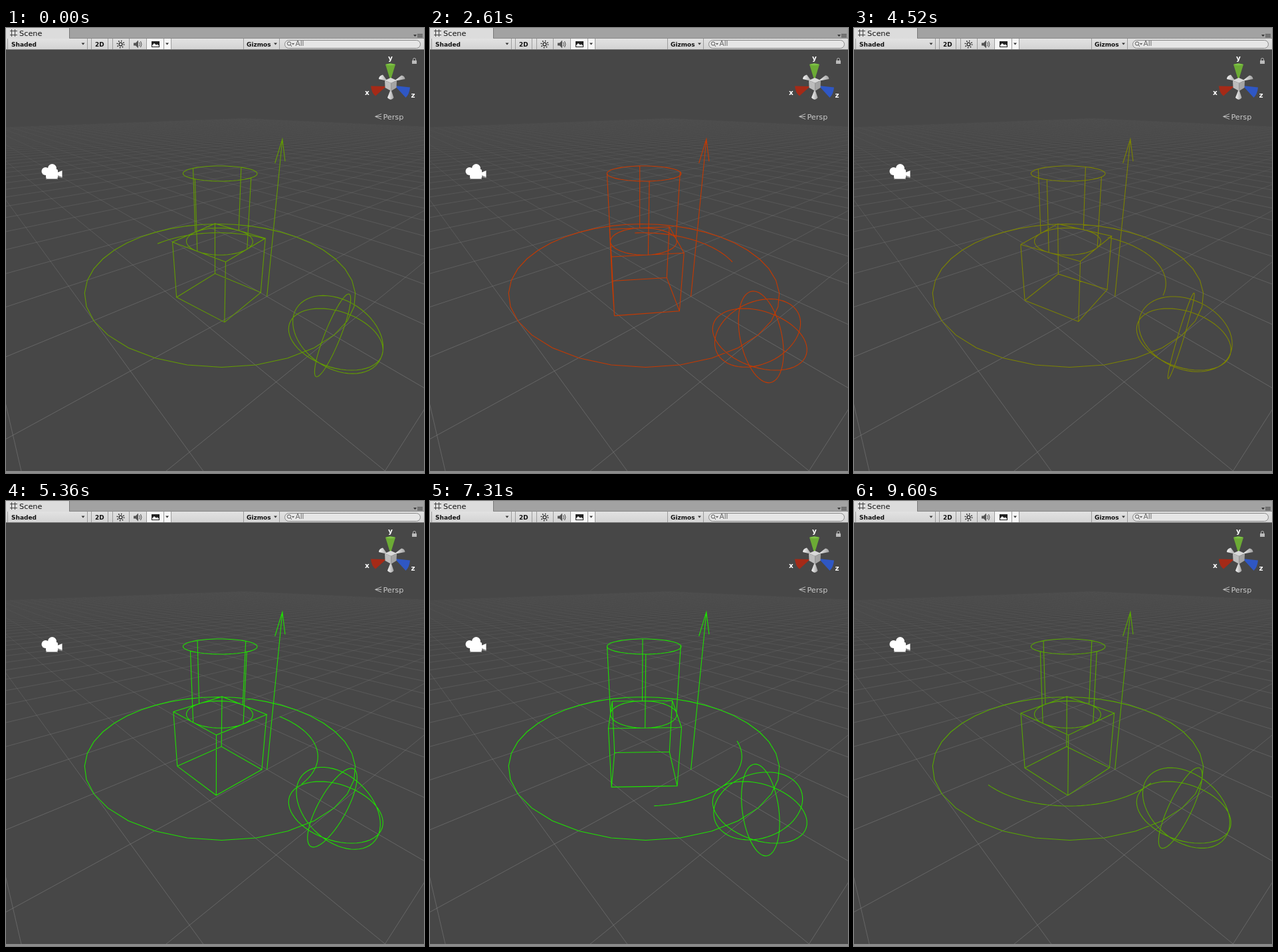
Animation of 629x671 px, one loop 9680 ms. Source, as an HTML page with a canvas:

```html
<!DOCTYPE html>
<html lang="en">
<head>
<meta charset="utf-8">
<title>Scene view</title>
<style>
  html, body { margin: 0; width: 100%; height: 100%; overflow: hidden; background: #474747; }
  canvas, svg { position: absolute; left: 0; top: 0; width: 629px; height: 671px; }
  text { font-family: "DejaVu Sans", sans-serif; fill: #111; }
  .bar { font-size: 9px; font-weight: bold; }
  .axis { font-size: 10.5px; font-weight: bold; fill: #fff; text-anchor: middle; }
</style>
</head>
<body>
<canvas id="view" width="629" height="671"></canvas>
<svg viewBox="0 0 629 671">
  <defs>
    <linearGradient id="tool" x2="0" y2="1"><stop stop-color="#e2e2e2"/><stop offset="1" stop-color="#d2d2d2"/></linearGradient>
    <linearGradient id="cone" x2="1"><stop stop-color="#f6f6f6"/><stop offset="1" stop-color="#a0a0a0"/></linearGradient>
  </defs>

  <!-- tab row -->
  <rect width="629" height="16" fill="#a2a2a2"/>
  <path d="M0 0H95.5V16H0Z" fill="#dcdcdc"/>
  <path d="M95.5 0V16" stroke="#777"/>
  <path d="M95 15.5H629" stroke="#8a8a8a"/>
  <path d="M8.500 2V13M13.500 2V13M6 4.500H17M6 10.500H17" stroke="#444" fill="none"/>
  <text x="20" y="12" font-size="11.3">Scene</text>
  <path d="M613 10h5l-2.500 3Z" fill="#333"/>
  <path d="M619 9.500h8M619 11.500h8M619 13.500h8" stroke="#444"/>

  <!-- toolbar -->
  <rect y="16" width="629" height="17" fill="url(#tool)"/>
  <path d="M0 32.500H629" stroke="#777"/>
  <rect x="211" y="16" width="37" height="16" fill="#f6f6f6"/>
  <path d="M2.500 16V32M122.500 16V32M128.500 16V32M153.500 16V32M160.500 16V32M185.500 16V32M211.500 16V32M237.500 16V32M248.500 16V32M357.500 16V32M411.500 16V32" stroke="#9c9c9c"/>
  <g class="bar">
    <text x="8" y="28">Shaded</text>
    <text x="134" y="28">2D</text>
    <text x="362" y="28">Gizmos</text>
  </g>
  <path d="M113.500 22.500h5l-2.500 3ZM403 22.500h5l-2.500 3ZM240 22.500h5l-2.500 3Z" fill="#333"/>
  <circle cx="172.500" cy="24.500" r="2.400" fill="none" stroke="#222" stroke-width="1.200"/>
  <circle cx="172.500" cy="24.500" r="5" fill="none" stroke="#222" stroke-width="2" stroke-dasharray="1.300 2.627"/>
  <path d="M192 22.500h3l4-4v12l-4-4h-3Z" fill="#555"/>
  <path d="M200.500 21.500q2 3 0 6M202.500 20q3 4.500 0 9" fill="none" stroke="#444"/>
  <rect x="219" y="20" width="12" height="9" fill="#222"/>
  <path d="M220 28v-2l3-3 3 2.500 2-1 2 2v1.500Z" fill="#f4f4f4"/>
  <rect x="419.500" y="18.500" width="204" height="12" rx="6" fill="#e6e6e6" stroke="#888"/>
  <circle cx="426" cy="23.500" r="2.700" fill="none" stroke="#555"/>
  <path d="M428 25.500l2 2.500" stroke="#555"/>
  <path d="M430 23h4l-2 2.500Z" fill="#555"/>
  <text x="435.500" y="27" font-size="10.500" style="fill:#666">All</text>

  <!-- camera icon -->
  <g fill="#fff">
    <circle cx="59.500" cy="216" r="6"/><circle cx="69.500" cy="211.500" r="6.500"/>
    <rect x="60" y="213" width="18" height="14" rx="2"/>
    <path d="M77 218l7.500-3v10l-7.500-3Z"/>
  </g>
  <path d="M60 227.500H78M78 224l6.500 2" stroke="#aaa" fill="none"/>

  <!-- orientation widget -->
  <path d="M574 80L561 77Q561 72 567 70.500Z" fill="url(#cone)"/>
  <path d="M584 80L595 71.500Q600 72 600.500 77Z" fill="url(#cone)"/>
  <path d="M579 92L574 105Q579 111 583.500 105Z" fill="url(#cone)"/>
  <path d="M571 55Q578.500 52 586 55L579.500 76h-2Z" fill="#6cab35"/>
  <path d="M571 55Q578.500 52 586 55Q578.500 58 571 55Z" fill="#7ec246"/>
  <path d="M572 88L549 87.500Q550 98 556 102.500Z" fill="#a52a17"/>
  <path d="M585 87L608 89.500Q607 100 601.500 105Z" fill="#2f57c4"/>
  <path d="M570 79l9-4 9 4-8.500 4Z" fill="#d8d8d8"/>
  <path d="M570 79l9.500 4v12l-9-5Z" fill="#bcbcbc"/>
  <path d="M588 79l-8.500 4v12l8-5Z" fill="#a4a4a4"/>
  <text class="axis" x="578.500" y="49">y</text>
  <text class="axis" x="543.500" y="101">x</text>
  <text class="axis" x="612.500" y="105">z</text>
  <rect x="611" y="49" width="7" height="5" fill="#bbb"/>
  <path d="M612.500 49v-1.500a2 2 0 0 1 4 0V49" fill="none" stroke="#bbb"/>
  <path d="M565 129.500L555.500 133.500L565 137.500M555.500 133.500H565" fill="none" stroke="#bbb"/>
  <text x="567.500" y="138" font-size="11.200" style="fill:#ccc">Persp</text>

  <path d="M0 668H629V671H0Z" fill="#8c8c8c"/>
</svg>

<script>
const LOOP = 9680, RAD = Math.PI / 180;
const ctx = document.getElementById('view').getContext('2d');

// Camera: ground axes are u (screen right) and w (towards the viewer), y is up.
const FOCAL = 447, CX = 315, CY = 350.5, YAW = 39.75 * RAD;
const sinP = Math.sin(27.8 * RAD), cosP = Math.cos(27.8 * RAD);

const toCam = ([u, y, w]) => [
  0.064 + u,
  0.134 - y * cosP + w * sinP,
  4.73 - w * cosP - y * sinP
];
const toScreen = ([x, y, d]) => [CX + FOCAL * x / d, CY + FOCAL * y / d];
const world = (x, y, z) => [
  z * Math.sin(YAW) - x * Math.cos(YAW), y,
  x * Math.sin(YAW) + z * Math.cos(YAW)
];
const polar = (deg, r, y) => [r * Math.sin(deg * RAD), y, r * Math.cos(deg * RAD)];
const add = (a, b) => a.map((v, i) => v + b[i]);

function path(points) {
  points.forEach((p, i) => ctx[i ? 'lineTo' : 'moveTo'](...toScreen(toCam(p))));
}

function clippedLine(a, b) {
  let p = toCam(a), q = toCam(b);
  if (p[2] < q[2]) [p, q] = [q, p];
  if (p[2] < 0.1) return;
  if (q[2] < 0.1) {
    const k = (p[2] - 0.1) / (p[2] - q[2]);
    q = p.map((v, i) => v + (q[i] - v) * k);
  }
  ctx.moveTo(...toScreen(p));
  ctx.lineTo(...toScreen(q));
}

const sweep = (n, at) => Array.from({ length: n + 1 }, (_, i) => at(i / n));
const ring = (r, y, n) => path(sweep(n, k => polar(k * 360, r, y)));

function drawGrid() {
  const fade = ctx.createLinearGradient(0, 120, 0, 480);
  [[0, 0], [0.06, 0.04], [0.17, 0.13], [0.4, 0.28], [1, 0.52]].forEach(
    ([at, a]) => fade.addColorStop(at, `rgba(128,128,128,${a})`));
  ctx.strokeStyle = fade;
  ctx.beginPath();
  for (let i = -40; i <= 40; i++) {
    clippedLine(world(i, 0, -40), world(i, 0, 40));
    clippedLine(world(-40, 0, i), world(40, 0, i));
  }
  ctx.stroke();
}

function drawCube(turn) {
  const corner = (i, y) => polar(turn + i * 90, Math.SQRT1_2, y);
  for (const y of [-0.5, 0.5]) path(sweep(4, k => corner(k * 4, y)));
  for (let i = 0; i < 4; i++) path([corner(i, -0.5), corner(i, 0.5)]);
}

function drawCylinder(turn) {
  for (const y of [0.5, 1.5]) ring(0.5, y, 60);
  for (let i = 0; i < 4; i++) {
    const a = turn + 45 + i * 90;
    path([polar(a, 0.5, 0.5), polar(a, 0.5, 1.5)]);
  }
}

function drawSphere(turn) {
  const mid = world(0, 0, 2);
  path(sweep(60, k => add(mid, polar(k * 360, 0.5, 0))));
  for (const a of [turn + 45, turn + 135]) {
    path(sweep(60, k => {
      const t = k * 2 * Math.PI;
      return add(mid, polar(a, 0.5 * Math.cos(t), 0.5 * Math.sin(t)));
    }));
  }
}

function drawArrow() {
  const tip = world(0, 2, 1);
  path([world(0, 0, 1), tip]);
  path([world(0.0855, 1.765, 1), tip, world(-0.0855, 1.765, 1)]);
}

// Bursts of steps: first and last change, in ms.
const BURSTS = [
  [470, 1380], [1450, 2380], [2450, 3370], [3440, 4370], [4440, 5360],
  [5460, 6370], [6450, 7380], [7460, 8370], [8450, 9370], [9450, 10360]
];

function pose(t) {
  if (t < 300) return { turn: 5.7, mix: 0.39 };
  if (t < 470) return { turn: 5.2, mix: 0.5 };
  const [from, to] = BURSTS.filter(b => b[0] <= t).pop();
  const step = (to - from) / 12;
  const s = (from + step * Math.min(12, Math.floor((t - from) / step + 0.07))) / 1000;
  const phase = (((s - 3.75) * 349 / 360) % 1 + 1) % 1;
  return { turn: -12.1 - 20.2 * (s - 1.3), mix: Math.abs(1 - 2 * phase) };
}

function draw(t) {
  const { turn, mix } = pose(t);
  ctx.fillStyle = '#474747';
  ctx.fillRect(0, 0, 629, 671);
  ctx.lineWidth = 1;
  drawGrid();
  ctx.strokeStyle = `rgb(${Math.round(255 * mix)},${Math.round(255 * (1 - mix))},0)`;
  ctx.lineWidth = 1.1;
  ctx.beginPath();
  ring(2, 0, 36);
  path(sweep(40, k => polar(turn + 137.4 + k * 87, 1.5, 0)));
  drawCube(turn);
  drawCylinder(turn);
  drawSphere(turn);
  drawArrow();
  ctx.stroke();
}

const start = performance.now();
function tick() {
  draw((performance.now() - start) % LOOP);
  requestAnimationFrame(tick);
}
tick();
</script>
</body>
</html>
```
